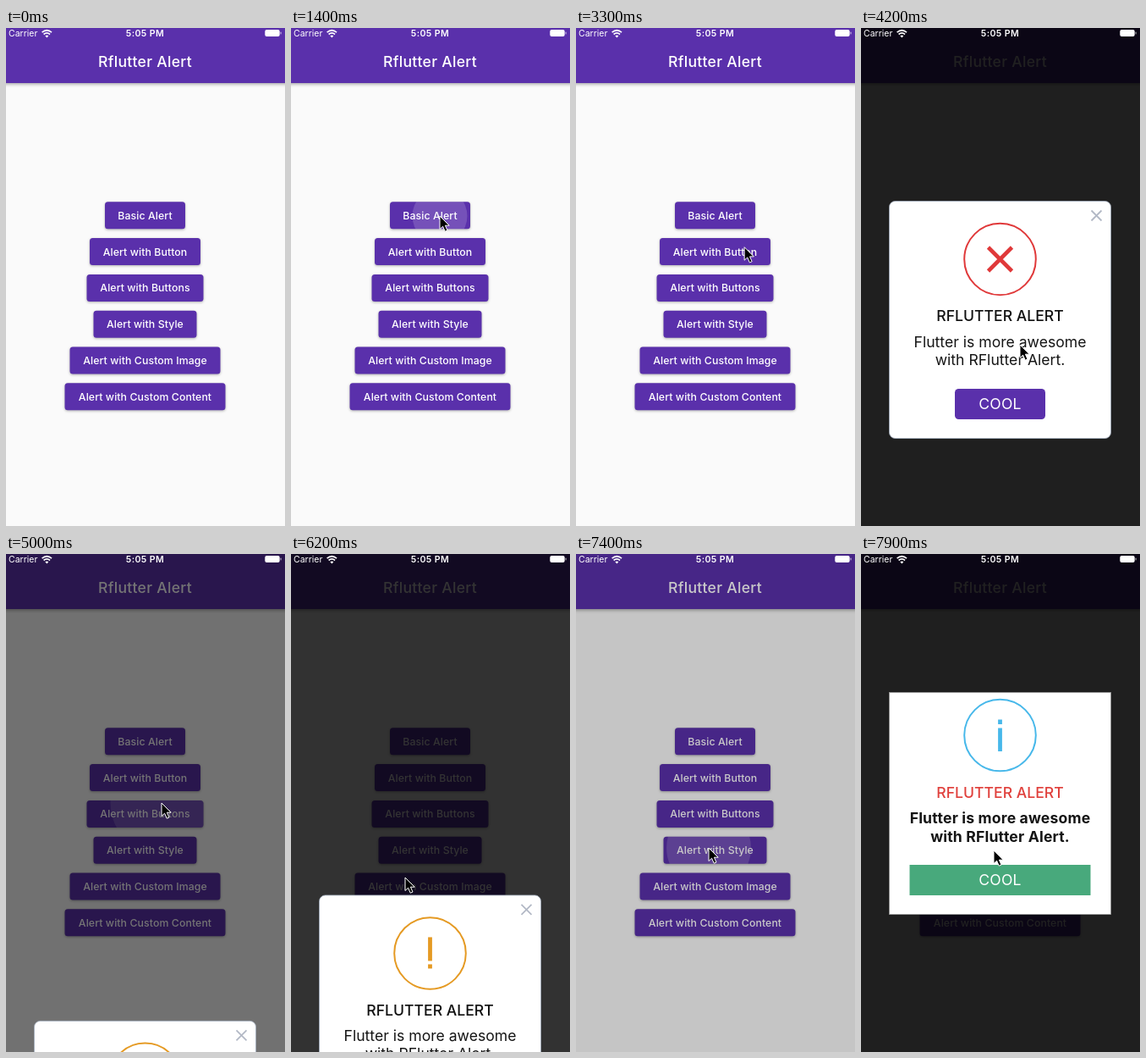
Recreate the animation shown at these times as an HTML page. Size 330x588 px, loop 8 s.

```html
<!DOCTYPE html>
<html lang="en">
<head>
<meta charset="utf-8">
<title>Alert demo</title>
<style>
  html, body { margin: 0; width: 100%; height: 100%; overflow: hidden; background: #fafafa; }
  svg { display: block; width: 330px; height: 588px; font-family: Inter, Roboto, sans-serif; }
  .raised { filter: drop-shadow(0 1.5px 1.5px rgba(0, 0, 0, .3)); }
  .bar { filter: drop-shadow(0 1.5px 2px rgba(0, 0, 0, .4)); }
</style>
</head>
<body>
<svg id="stage" viewBox="0 0 330 588"></svg>
<script>
const LOOP = 8000, STEP = 100, CX = 164.5, HEIGHT = 588;
const PURPLE = '#5a30ab', GREEN = '#48a97c';
const stage = document.getElementById('stage');

function add(parent, tag, attrs = {}, text) {
  const el = document.createElementNS('http://www.w3.org/2000/svg', tag);
  for (const key in attrs) el.setAttribute(key, attrs[key]);
  if (text) el.textContent = text;
  parent.appendChild(el);
  return el;
}

const box = (parent, x, y, width, height, rx, fill, more) =>
  add(parent, 'rect', { x, y, width, height, rx, fill, ...more });

// cy is the middle of the capital letters
function label(parent, text, x, cy, size, weight, fill, spacing = 0, anchor = 'middle') {
  return add(parent, 'text', {
    x, y: cy + size * 0.36, fill, 'font-size': size, 'font-weight': weight,
    'letter-spacing': spacing, 'text-anchor': anchor
  }, text);
}

const stroke = (parent, d, color, width) =>
  add(parent, 'path', { d, fill: 'none', stroke: color, 'stroke-width': width });

// Page
box(stage, 0, 0, 330, HEIGHT, 0, '#fafafa');
box(stage, -8, -8, 346, 73, 0, PURPLE, { class: 'bar' });
label(stage, 'Rflutter Alert', CX, 40, 17.6, 500, '#fff', 0.28);

const buttons = [
  ['Basic Alert', 95], ['Alert with Button', 131], ['Alert with Buttons', 138],
  ['Alert with Style', 122], ['Alert with Custom Image', 178], ['Alert with Custom Content', 190]
].map(([text, w], i) => {
  const x = CX - w / 2, y = 205.3 + i * 42.8;
  box(stage, x, y, w, 32, 3.5, PURPLE, { class: 'raised' });
  const clip = add(stage, 'clipPath', { id: 'clip' + i });
  box(clip, x, y, w, 32, 3.5);
  const group = add(stage, 'g', { 'clip-path': `url(#clip${i})` });
  const ripple = add(group, 'circle', { fill: '#fff', opacity: 0 });
  label(stage, text, CX, y + 16, 12.32, 500, '#fff', 0.08);
  return ripple;
});

const shade = box(stage, 0, 0, 330, HEIGHT, 0, '#000', { opacity: 0 });

// Alert icons, centred on 0,0
const icons = {
  error: ['#e0393a', (g, c) => stroke(g, 'M-14-14L14 14M14-14L-14 14', c, 4.6)],
  warning: ['#e59a23', (g, c) => {
    box(g, -2.4, -19, 4.8, 28, 0, c);
    box(g, -2.4, 13, 4.8, 5, 0, c);
  }],
  info: ['#47b8ea', (g, c) => {
    box(g, -2.4, -18.5, 4.8, 5.5, 0, c);
    box(g, -2.4, -8.5, 4.8, 27.5, 0, c);
  }]
};

function makeAlert({ top, height, icon, iconY, titleY, descY, actions, styled }) {
  const g = add(stage, 'g', { visibility: 'hidden' });
  box(g, 33.5, top + 0.5, 262, height - 1, styled ? 0 : 7, '#fff',
    { stroke: styled ? '#9a9a9a' : '#a9b4c4', 'stroke-width': 0.8 });
  if (!styled) stroke(g, `M272.5 ${top + 11.5}l12 12m0-12l-12 12`, '#b3b9c6', 1.8);
  if (icon) {
    const [color, draw] = icons[icon];
    const mark = add(g, 'g', { transform: `translate(${CX} ${top + iconY})` });
    add(mark, 'circle', { r: 42.3, fill: 'none', stroke: color, 'stroke-width': 2 });
    draw(mark, color);
  }
  label(g, 'RFLUTTER ALERT', CX, top + titleY, 17.6, 500, styled ? '#e0403c' : '#111');
  ['Flutter is more awesome', 'with RFlutter Alert.'].forEach((line, i) =>
    label(g, line, CX, top + descY + i * 21.2, 17.6, styled ? 700 : 400, '#151515', styled ? 0.16 : 0));
  for (const [text, x, w, y, fill] of actions) {
    box(g, x, top + y, w, 36, styled ? 0 : 4.5, fill);
    label(g, text, x + w / 2, top + y + 18, 17.6, 400, '#fff', 0.2);
  }
  return g;
}

const gradient = add(add(stage, 'defs'), 'linearGradient', { id: 'blend' });
add(gradient, 'stop', { offset: 0, 'stop-color': '#7474bf' });
add(gradient, 'stop', { offset: 1, 'stop-color': '#348ac7' });

const tall = { top: 204, height: 281, iconY: 69, titleY: 136, descY: 166.5 };
const alerts = [
  { open: 1400, close: 2750, time: 200, from: 1, top: 197, height: 195, titleY: 50.5, descY: 81,
    actions: [['CANCEL', 56, 217, 136.3, PURPLE]] },
  { open: 3640, close: 4530, time: 200, from: 1, ...tall, icon: 'error',
    actions: [['COOL', 111, 107, 222, PURPLE]] },
  { open: 4918, close: 6132.5, time: 200, from: 1, ...tall, icon: 'warning',
    actions: [['FLAT', 56, 105, 222, GREEN], ['GRADIENT', 168, 105, 222, 'url(#blend)']] },
  { open: 7324, close: 9000, time: 400, from: -1, top: 163, height: 263, icon: 'info', iconY: 51,
    titleY: 119, descY: 149, styled: true, actions: [['COOL', 57.5, 214, 204, GREEN]] }
];
for (const a of alerts) a.el = makeAlert(a);

// Status bar
const status = add(stage, 'g');
label(status, 'Carrier', 3, 6, 10.5, 400, '#fff', 0, 'start');
stroke(status, 'M42.6 5.2Q48.3 .3 54 5.2M44.6 7.5Q48.3 4.4 52 7.5', '#fff', 1.7);
add(status, 'path', { d: 'M46.3 9.2Q48.3 7.6 50.3 9.2L48.3 11.4Z', fill: '#fff' });
label(status, '5:05 PM', CX, 6, 10.6, 600, '#fff', 0.4);
box(status, 306.3, 2, 17.4, 8, 2, '#fff');
box(status, 324.5, 4.6, 1.2, 2.8, 0.6, '#fff', { opacity: 0.6 });

const cursor = add(stage, 'path', {
  d: 'M0 0V15.5L3.6 12.2L6.2 18.2L9 17L6.4 11.2H11.2Z',
  fill: '#000', stroke: '#fff', 'stroke-width': 1, 'stroke-linejoin': 'round'
});

// time, x, y
const path = [
  [400, 340, 330], [1100, 176, 222], [1900, 176, 222], [2300, 260, 196], [2600, 278, 213],
  [2900, 278, 213], [3400, 190, 264], [3800, 190, 264], [4200, 188, 374], [4400, 176, 442],
  [4600, 176, 442], [4850, 184, 294], [5200, 184, 294], [5700, 112, 440], [6080, 112, 440],
  [6200, 135, 382], [6500, 158, 349], [7400, 157, 347], [7900, 157, 350]
];
const presses = [1350, 3590, 4870, 7300];

const clamp = v => Math.min(1, Math.max(0, v));

function cursorAt(t) {
  const i = path.findIndex(p => p[0] > t);
  if (i === 0) return path[0].slice(1);
  if (i < 0) return path[path.length - 1].slice(1);
  const [t0, x0, y0] = path[i - 1], [t1, x1, y1] = path[i];
  const u = (t - t0) / (t1 - t0), k = u * u * (3 - 2 * u);
  return [x0 + (x1 - x0) * k, y0 + (y1 - y0) * k];
}

function render(t) {
  let dim = 0;
  for (const a of alerts) {
    const p = t < a.close ? clamp((t - a.open) / a.time) : clamp(1 - (t - a.close) / a.time);
    a.el.setAttribute('visibility', p > 0 ? 'visible' : 'hidden');
    a.el.setAttribute('transform', `translate(0 ${a.from * HEIGHT * (1 - p)})`);
    dim = Math.max(dim, 1 - (1 - p ** 1.5) ** 3.2);
  }
  shade.setAttribute('opacity', 0.875 * dim);

  presses.forEach((start, i) => {
    const age = t - start, [x, y] = cursorAt(start);
    const on = age >= 0 && age < 400;
    buttons[i].setAttribute('cx', x);
    buttons[i].setAttribute('cy', y);
    buttons[i].setAttribute('r', on ? 15 + age * 0.35 : 0);
    buttons[i].setAttribute('opacity', on ? 0.16 * clamp((400 - age) / 250) : 0);
  });

  const [x, y] = cursorAt(t);
  cursor.setAttribute('transform', `translate(${x} ${y})`);
}

const begin = performance.now();
function tick() {
  const t = (performance.now() - begin) % LOOP;
  render(Math.floor(t / STEP) * STEP);
  requestAnimationFrame(tick);
}
tick();
</script>
</body>
</html>
```
